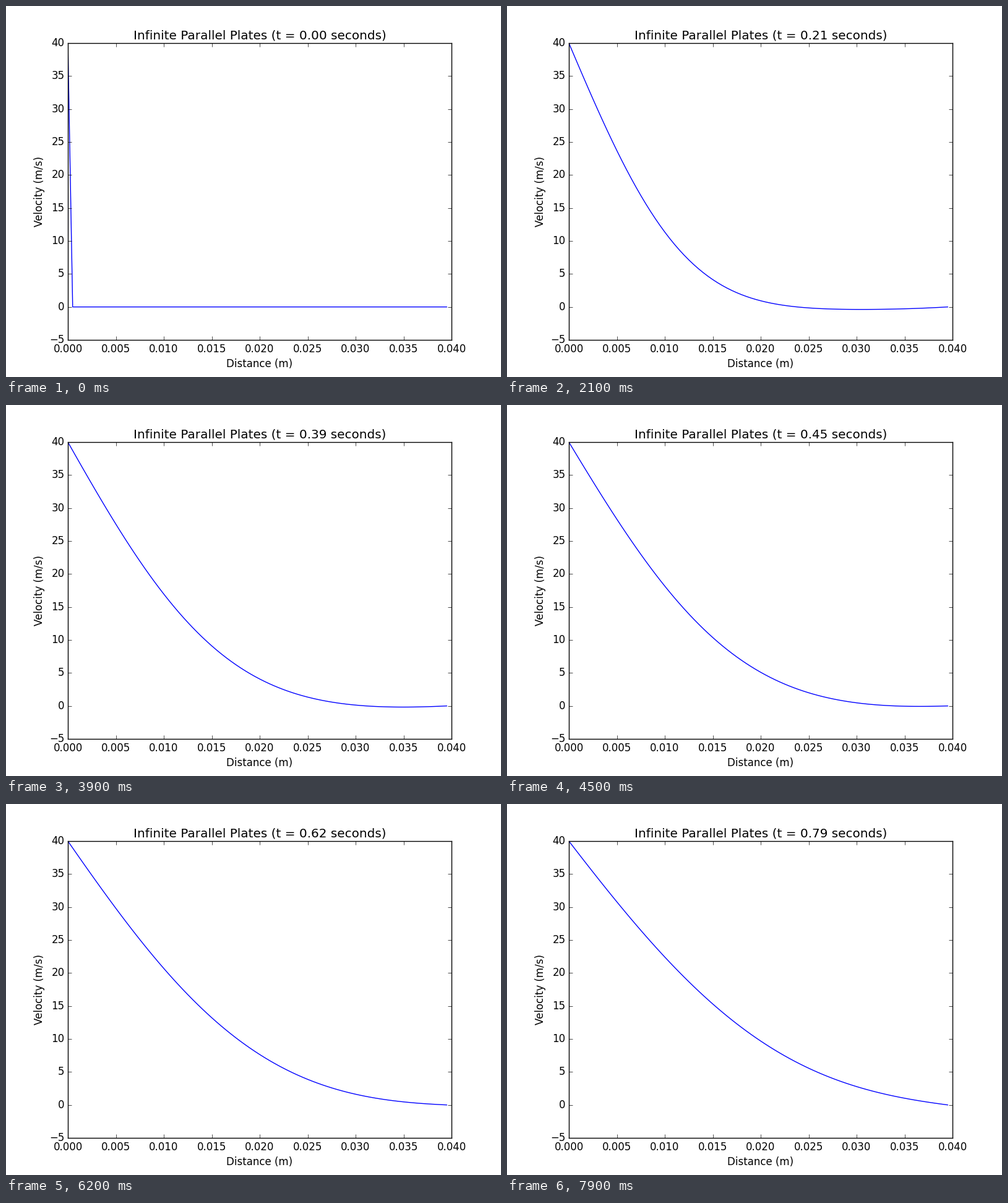
A matplotlib script for the animation above (8000 ms loop, 800x600 px).

```python
import numpy as np
import matplotlib.pyplot as plt
from matplotlib.animation import FuncAnimation

plt.style.use("classic")
plt.rcParams["font.family"] = "DejaVu Sans"

FRAMES = 80
FRAME_DT = 0.01       # simulated seconds per frame
SUBSTEPS = 20
GAP = 0.04            # plate distance, m
DY = 0.0005
WALL_SPEED = 40.0     # m/s
NU = 0.000217         # kinematic viscosity, m^2/s
FORCING = 2.5         # pressure gradient / density, m/s^2

y = np.arange(round(GAP / DY)) * DY


def solve():
    """Explicit diffusion of the wall speed into a fluid at rest."""
    dt = FRAME_DT / SUBSTEPS
    d = NU * dt / DY**2
    u = np.zeros_like(y)
    u[0] = WALL_SPEED
    profiles = [u.copy()]
    for _ in range(FRAMES - 1):
        for _ in range(SUBSTEPS):
            u[1:-1] += d * (u[2:] - 2 * u[1:-1] + u[:-2]) - FORCING * dt
        profiles.append(u.copy())
    return profiles


profiles = solve()

fig = plt.figure(figsize=(8, 6), dpi=100, facecolor="white")
ax = fig.add_axes([0.125, 0.1, 0.775, 0.8])
ax.set_xlim(0, GAP)
ax.set_ylim(-5, 40)
ax.set_xlabel("Distance (m)")
ax.set_ylabel("Velocity (m/s)")
title = ax.set_title("", y=1.0)
line, = ax.plot(y, profiles[0], color="#0000ff", lw=1)


def update(i):
    line.set_ydata(profiles[i])
    title.set_text(f"Infinite Parallel Plates (t = {i * FRAME_DT:.2f} seconds)")
    return line, title


anim = FuncAnimation(fig, update, frames=FRAMES, interval=100,
                     repeat=True, repeat_delay=0, blit=False)
plt.show()
```
